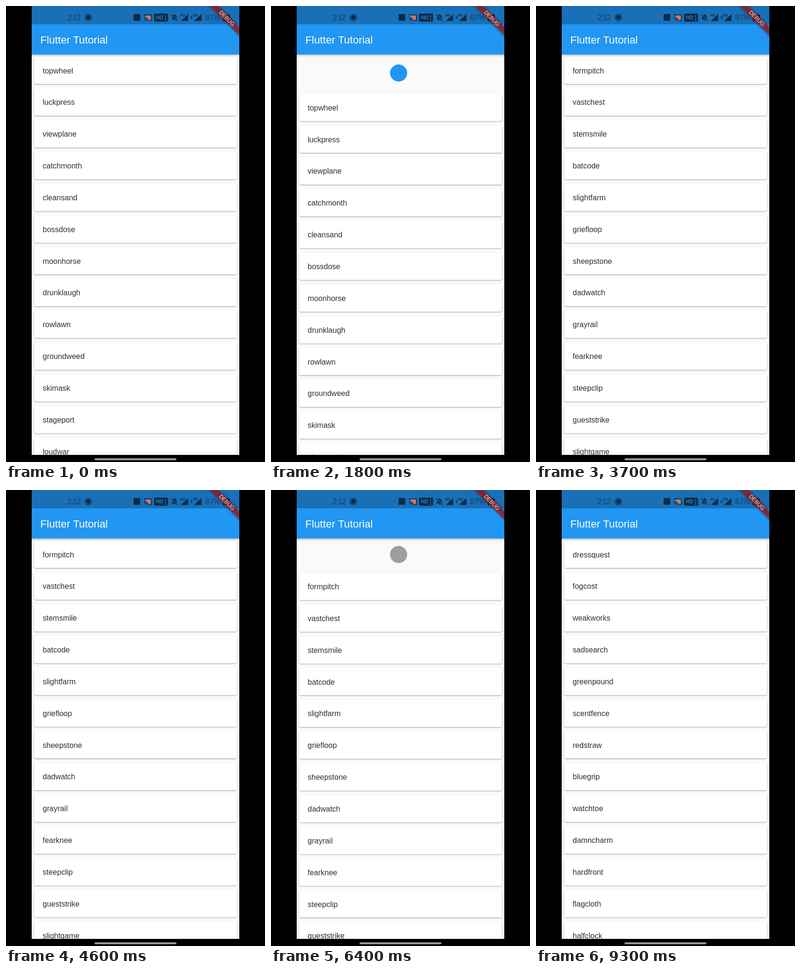
Write an HTML page that moves like this. It is 544 px wide and 960 px high and loops after 9400 ms.

```html
<!DOCTYPE html>
<html lang="en">
<head>
<meta charset="utf-8">
<title>Pull to refresh</title>
<style>
  html, body { margin: 0; width: 100%; height: 100%; overflow: hidden; background: #000; }
  svg { display: block; width: 544px; height: 960px; }
  text { font-family: "Liberation Sans", Arial, sans-serif; }
  .row { font-size: 16px; fill: #303030; }
</style>
</head>
<body>
<svg viewBox="0 0 544 960">
  <defs>
    <filter id="lift" x="-5%" y="-20%" width="110%" height="150%">
      <feDropShadow dx="0" dy="1.2" stdDeviation="1.1" flood-color="#000" flood-opacity=".36"/>
    </filter>
    <filter id="blur" x="-20%" y="-100%" width="140%" height="300%">
      <feGaussianBlur stdDeviation="2.5"/>
    </filter>
    <clipPath id="screen"><rect x="54" width="436" height="945"/></clipPath>
  </defs>
  <rect width="544" height="960"/>
  <g clip-path="url(#screen)">
    <rect x="54" width="436" height="945" fill="#fafafa"/>
    <circle id="mark"/>
    <g id="list"></g>
    <rect x="50" y="94" width="444" height="9" fill="#000" opacity=".4" filter="url(#blur)"/>
    <rect x="54" y="38" width="436" height="64" fill="#2196f3"/>
    <text x="72" y="79" font-size="22.2" fill="#fff">Flutter Tutorial</text>
    <rect x="54" width="436" height="38.5" fill="#1970b6"/>

    <g fill="#0c2b47">
      <text x="129" y="30" font-size="16" letter-spacing="-1" fill="#123f66">2:12</text>
      <circle cx="173" cy="24.3" r="7" fill="none" stroke="#0c2b47" stroke-width="1.3"/>
      <circle cx="173" cy="24.3" r="5"/>
      <rect x="268" y="17" width="14" height="14" rx="1"/>
      <path d="M291 22V18.5H305.5V30.5H300" fill="none" stroke="#0c2b47" stroke-width="1.5"/>
      <path d="M293 20.5H304V29H300Q298 24 293 23Z" fill="#f0734a"/>
      <path d="M290.5 24.5a6.5 6.5 0 0 1 6.5 6.5M290.5 27.5a3.5 3.5 0 0 1 3.5 3.5" fill="none" stroke="#0c2b47" stroke-width="1.4"/>
      <rect x="311" y="16" width="29.5" height="17" rx="3"/>
      <g fill="#2a80c4" font-weight="bold">
        <text x="315" y="28.3" font-size="10.5">HD</text>
        <text x="333" y="23.6" font-size="7">1</text>
        <text x="333" y="31.4" font-size="7">2</text>
      </g>
      <path d="M347.5 28.5L349.5 26V22.5Q350 18.8 353.5 18V17H354.5V18Q358 18.8 358.5 22.5V26L360.5 28.5ZM352 29.5H356Q354 32.5 352 29.5Z"/>
      <path d="M347 17.5L361 31.5" stroke="#1970b6" stroke-width="2.6"/>
      <path d="M346.5 18L360 31.5" stroke="#0c2b47" stroke-width="1.4"/>
      <path d="M382.5 17V31.5H367.5ZM410.5 17V31.5H395Z"/>
      <text x="366" y="22" font-size="7.5" font-weight="bold">4G</text>
      <text x="393" y="22" font-size="7.5" font-weight="bold">5G</text>
      <path d="M387.5 23.5L389.8 20.5L392 23.5ZM387.5 25L389.8 28L392 25Z"/>
      <text x="418" y="30" font-size="16" fill="#123f66">87%</text>
      <rect x="455" y="17.5" width="15" height="14.5" rx="2"/>
    </g>

    <g transform="translate(463.5 26.5) rotate(45)">
      <rect x="-65" y="-6.4" width="130" height="12.8" opacity=".5" filter="url(#blur)"/>
      <rect x="-65" y="-6.4" width="130" height="12.8" fill="#b71c1c" opacity=".63"/>
      <text y="3.2" font-size="11.6" fill="#f1e6e8" text-anchor="middle">DEBUG</text>
    </g>
  </g>
  <rect x="186" y="952.3" width="172" height="4" rx="2" fill="#9c9c9c"/>
  <circle id="touch" r="12.5" fill="#fff" fill-opacity=".65" stroke="#d2d2dc" stroke-width="1.8"/>
</svg>
<script>
const LOOP = 9400, STEP = 100, PITCH = 66.85;
const pages = [
  "topwheel luckpress viewplane catchmonth cleansand bossdose moonhorse drunklaugh rowlawn groundweed skimask stageport loudwar",
  "formpitch vastchest stemsmile batcode slightfarm griefloop sheepstone dadwatch grayrail fearknee steepclip gueststrike slightgame",
  "dressquest fogcost weakworks sadsearch greenpound scentfence redstraw bluegrip watchtoe damncharm hardfront flagcloth halfclock"
].map(s => s.split(" "));

// [time, list offset]
const pulls = [
  [0, 0], [900, 0], [1100, 38], [1500, 134.5], [1650, 134.5], [1900, 67.5], [3300, 67.5], [3500, 18], [3600, 0],
  [5100, 0], [5300, 38], [5600, 134.5], [5750, 134.5], [6000, 67.5], [7400, 67.5], [7600, 18], [7700, 0], [LOOP, 0]
];
const drags = [[900, 1650], [5100, 5750]];
const loads = [3300, 7400];

const $ = id => document.getElementById(id);
function add(parent, tag, attrs) {
  const el = document.createElementNS("http://www.w3.org/2000/svg", tag);
  for (const k in attrs) el.setAttribute(k, attrs[k]);
  return parent.appendChild(el);
}
function set(el, attrs) {
  for (const k in attrs) el.setAttribute(k, attrs[k]);
}

const list = $("list"), mark = $("mark"), touch = $("touch");
const rows = pages[0].map((_, i) => {
  const y = 107 + i * PITCH;
  add(list, "rect", { x: 59, y, width: 426, height: 57, rx: 4, fill: "#fff", filter: "url(#lift)" });
  return add(list, "text", { x: 77, y: y + 34.5, class: "row" });
});

function offsetAt(t) {
  const i = pulls.findIndex(p => p[0] > t);
  const [t0, a] = pulls[i - 1], [t1, b] = pulls[i];
  let k = (t - t0) / (t1 - t0);
  if (b < a) k = 1 - (1 - k) ** 2;
  return a + (b - a) * k;
}

let shown = -1;
function draw(t) {
  const off = offsetAt(t);
  const page = loads.filter(x => t >= x).length;
  if (page !== shown) {
    rows.forEach((r, i) => r.textContent = pages[page][i]);
    shown = page;
  }
  list.setAttribute("transform", `translate(0 ${off})`);
  const s = Math.min(1, off / 42);
  set(mark, { cx: 272 - 4 * s, cy: 102 + off / 2, r: 18 * s, fill: off > 70 ? "#2196f3" : "#9e9e9e" });
  const held = drags.some(([a, b]) => t >= a && t < b);
  set(touch, { cx: 195 + off * .216, cy: 376 + off * 2.55, visibility: held ? "visible" : "hidden" });
}

function tick() {
  const t = performance.now() % LOOP;
  draw(Math.floor(t / STEP) * STEP);
  requestAnimationFrame(tick);
}
tick();
</script>
</body>
</html>
```
